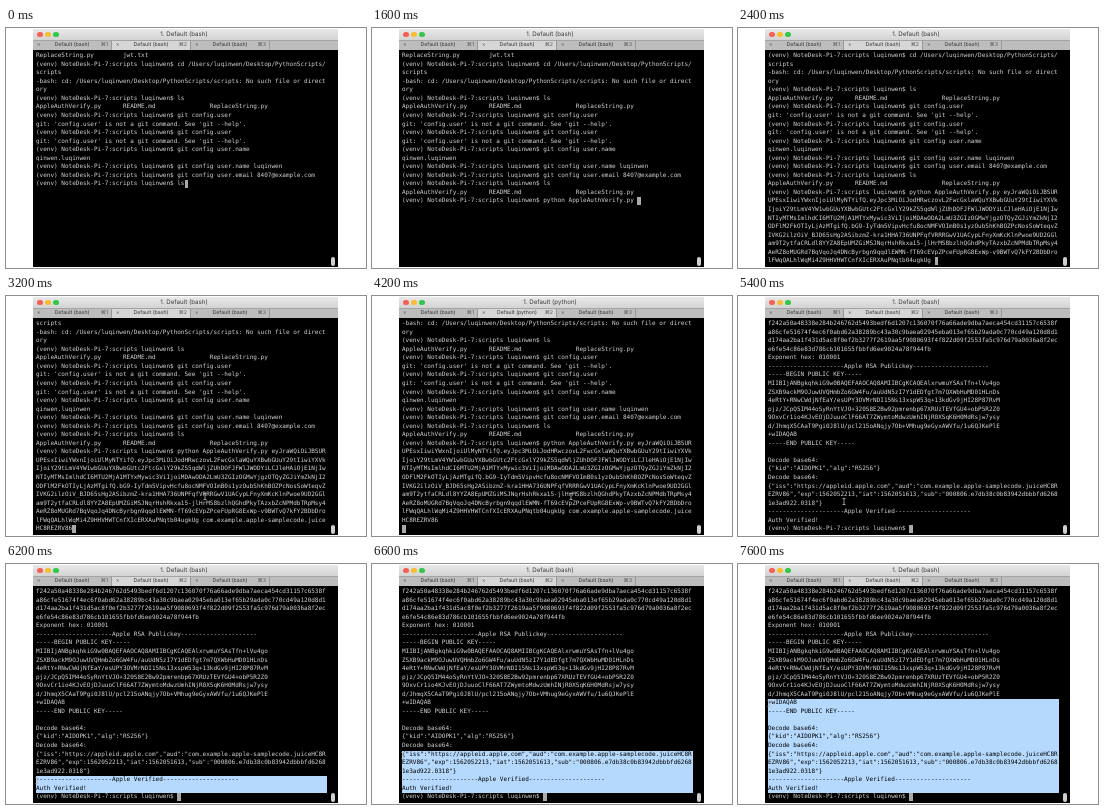
An HTML page that plays this animation: 360 px wide and 240 px high, repeating every 7.8 s.

```html
<!DOCTYPE html>
<html lang="en">
<head>
<meta charset="utf-8">
<title>Terminal session</title>
<style>
  html, body { margin: 0; width: 100%; height: 100%; overflow: hidden; background: #fff; }
  #stage { position: relative; width: 360px; height: 240px; overflow: hidden; text-rendering: geometricPrecision; }
  #stage div { box-sizing: border-box; }
  #win { position: absolute; left: 27px; top: 1px; width: 305px; height: 238px; background: #000; }
  #bar { height: 11px; background: linear-gradient(#e9e9e9, #d3d3d3); color: #3c3c3c;
    font: 6.2px/12px Inter, Roboto, sans-serif; text-align: center; padding-right: 3px; }
  #bar i { position: absolute; top: 2.5px; width: 5.4px; height: 5.4px; border-radius: 50%; }
  #tabs { display: flex; height: 10px; background: #bdbdbd; border-top: .5px solid #a4a4a4; }
  .tab { position: relative; width: 79px; border-right: .5px solid #989898; color: #333;
    font: 5.2px/9px Inter, "DejaVu Sans", sans-serif; text-align: center; }
  .tab.on { background: #d6d6d6; }
  .tab b { position: absolute; top: 0; left: 4px; font-weight: 400; color: #555; }
  .tab b:last-child { left: auto; right: 3px; }
  #term { position: absolute; left: 30px; top: 24.2px; color: #d4d4d4;
    font: 6.02px/8.56px "DejaVu Sans Mono", monospace; }
  .row { width: 290.5px; height: 8.56px; white-space: pre; }
  .row.sel { background: #b5d8fd; color: #000; }
  .caret { display: inline-block; width: 3.6px; height: 7.6px; background: #a9a9a9; vertical-align: top; }
  #knob { position: absolute; left: 324.5px; top: 229px; width: 4px; height: 9px; border-radius: 2px; background: #d0d0d0; }
  #mouse { position: absolute; width: 4px; height: 7px; margin: -3.5px -2px; }
</style>
</head>
<body>
<div id="stage">
  <div id="win">
    <div id="bar">
      <i style="left:4.3px;background:#f55f57"></i><i style="left:12.3px;background:#f8bd30"></i><i style="left:20.3px;background:#32c748"></i>
      <span id="title"></span>
    </div>
    <div id="tabs">
      <div class="tab"><b>×</b>Default (bash)<b>⌘1</b></div>
      <div class="tab on"><b>×</b><span id="job"></span><b>⌘2</b></div>
      <div class="tab"><b>×</b>Default (bash)<b>⌘3</b></div>
    </div>
  </div>
  <div id="term"></div>
  <div id="knob"></div>
  <svg id="mouse" viewBox="0 0 4 7"><path d="M.5 .5H3.5M2 .5V6.5M.5 6.5H3.5" fill="none" stroke="#bbb" stroke-width=".8"/></svg>
</div>
<script>
const LOOP = 7800, STEP = 200, COLS = 80, ROWS = 25;
const ENTER_LS = 400, PASTE_TOKEN = 2200, PASTE_CLIENT = 3000, RUN = 4000, DONE = 4800;
const DRAG = 6000, DRAG_END = 7600;
const $ = id => document.getElementById(id);

const prompt = '(venv) NoteDesk-Pi-7:scripts luqinwen$ ';
const folder = '/Users/luqinwen/Desktop/PythonScripts/scripts';
const noCommand = "git: 'config.user' is not a git command. See 'git --help'.";
const listing = 'AppleAuthVerify.py'.padEnd(24) + 'README.md'.padEnd(24) + 'ReplaceString.py';
const rule = text => '-'.repeat(21) + text + '-'.repeat(21);

const history = [
  'ReplaceString.py'.padEnd(24) + 'jwt.txt',
  prompt + 'cd ' + folder,
  `-bash: cd: ${folder}: No such file or directory`,
  prompt + 'ls',
  listing,
  prompt + 'git config.user',
  noCommand,
  prompt + 'git config.user',
  noCommand,
  prompt + 'git config user.name',
  'qinwen.luqinwen',
  prompt + 'git config user.name luqinwen',
  prompt + 'git config user.email 8407@example.com',
  prompt + 'ls'
];

const command = 'python AppleAuthVerify.py ';
const token = 'eyJraWQiOiJBSUR' +
  'UPEsxIiwiYWxnIjoiUlMyNTYifQ.eyJpc3MiOiJodHRwczovL2FwcGxlaWQuYXBwbGUuY29tIiwiYXVk' +
  'IjoiY29tLmV4YW1wbGUuYXBwbGUtc2FtcGxlY29kZS5qdWljZUhDOFJFWlJWODYiLCJleHAiOjE1NjIw' +
  'NTIyMTMsImlhdCI6MTU2MjA1MTYxMywic3ViIjoiMDAwODA2LmU3ZGIzOGMwYjgzOTQyZGJiYmZkNjI2' +
  'ODFlM2FkOTIyLjAzMTgifQ.bG9-IyTdm5VipvHcfu8ocNMFVOImB0s1yzOubShKhBOZPcNosSoWteqvZ' +
  'IVKG2ilzOiV_BJD65sHg2ASibzmZ-kra1HHA736UNPFqfVRRRGwV1UACypLFnyXmKcKlnPwoe9UD2GGl' +
  'am9T2ytfaCRLdl8YYZA8EpUMZGiMSJNqrHshRkxa15-jlHrMS8bzlhQGhdPkyTAzxbZcNPMdbTRpMsy4' +
  'AeRZ8oMUGRd7BqVqoJq4DNcByrbgn9qqdlEWMN-fT69cEVpZPceFUpRG8ExWp-v9BWTvQ7kFY2BDbDro' +
  'lFWqQALhlWqMi4Z9HHVHWTCnfXIcERXAuPNqtb04ugkUg ';
const client = 'com.example.apple-samplecode.juiceHC8REZRV86';

const output = [
  'f242a50a48338e284b246762d5493bedf6d1207c136070f76a66ade9dba7aeca454cd31157c6538f' +
  'a86cfe51674f4ec6f0abd62a38289bc43a30c9baea02945eba013ef65b29ada0c770cd49a120d8d1' +
  'd174aa2ba1f431d5ac8f0ef2b3277f2619aa5f9080693f4f822d09f2553fa5c976d79a0036a8f2ec' +
  'e6fe54c86e83d786cb101655fbbfd6ee9024a78f944fb',
  'Exponent hex: 010001',
  rule('Apple RSA Publickey'),
  '-----BEGIN PUBLIC KEY-----',
  'MIIBIjANBgkqhkiG9w0BAQEFAAOCAQ8AMIIBCgKCAQEAlxrwmuYSAsTfn+lVu4go',
  'ZSXB9ackM9OJuwUVQHmbZo6GW4Fu/auUdN5zI7Y1dEDfgt7m7QXWbHuMD01HLnDs',
  '4eRtY+RNwCWdjNfEaY/esUPY3OVMrNDI15Ns13xspW53q+13kdGv9jHI28P87RvM',
  'pjz/JCpQ5IM44oSyRnYtVJO+320S8E2Bw92pmrenbp67XRUzTEVfGU4+obP5R2Z0',
  '9OxvCr1io4KJvEOjDJuuoClF66AT7ZWymtoMdwzUmhINjR0XSqK6H0MdRsjw7ysy',
  'd/JhmqX5CAaT9Pgi0J8lU/pcl215oANqjy7Ob+VMhug9eGyxAWVfu/1u6QJKePlE',
  '+wIDAQAB',
  '-----END PUBLIC KEY-----',
  '',
  'Decode base64:',
  '{"kid":"AIDOPK1","alg":"RS256"}',
  'Decode base64:',
  '{"iss":"https://appleid.apple.com","aud":"com.example.apple-samplecode.juiceHC8REZRV86",' +
  '"exp":1562052213,"iat":1562051613,"sub":"000806.e7db38c0b83942dbbbfd62681e3ad922.0318"}',
  rule('Apple Verified'),
  'Auth Verified!',
  prompt
];

const clamp = v => Math.max(0, Math.min(1, v));
const progress = (t, from, to) => clamp((t - from) / (to - from));
const mix = (a, b, k) => a + (b - a) * k;

function session(t) {
  if (t < ENTER_LS) return history;
  const keys = Math.round(command.length * progress(t, ENTER_LS, 1600));
  const input = command.slice(0, keys) + (t >= PASTE_TOKEN ? token : '') + (t >= PASTE_CLIENT ? client : '');
  const reply = t >= DONE ? output : t >= RUN ? [''] : [];
  return [...history, listing, prompt + input, ...reply];
}

const wrap = line => line.match(new RegExp(`.{1,${COLS}}`, 'g')) || [''];

// First selected row while dragging upwards from the last output line.
const selectedFrom = t => t < DRAG ? ROWS : Math.round(mix(23, 13, progress(t, DRAG, DRAG_END)));

function pointer(t) {
  if (t < 2600) return null;
  if (t < DONE) return [199, 200];
  if (t >= DRAG) return [31, 28.5 + 8.56 * selectedFrom(t)];
  const k = progress(t, DONE, DRAG);
  return [mix(181, 31, k), mix(185, 225, k)];
}

function draw(t) {
  const job = `Default (${t >= RUN && t < DONE ? 'python' : 'bash'})`;
  $('title').textContent = '1. ' + job;
  $('job').textContent = job;

  const first = selectedFrom(t);
  const rows = session(t).flatMap(wrap).slice(-ROWS).map((text, i) => {
    const row = document.createElement('div');
    row.className = i >= first && i < ROWS - 1 ? 'row sel' : 'row';
    row.textContent = text;
    return row;
  });
  const caret = document.createElement('span');
  caret.className = 'caret';
  rows[rows.length - 1].append(caret);
  $('term').replaceChildren(...rows);

  const spot = pointer(t);
  $('mouse').style.display = spot ? '' : 'none';
  if (spot) {
    $('mouse').style.left = spot[0] + 'px';
    $('mouse').style.top = spot[1] + 'px';
  }
}

const start = performance.now();
let shown = -1;
function tick() {
  const t = Math.floor((performance.now() - start) % LOOP / STEP) * STEP;
  if (t !== shown) draw(shown = t);
  requestAnimationFrame(tick);
}
tick();
</script>
</body>
</html>
```
